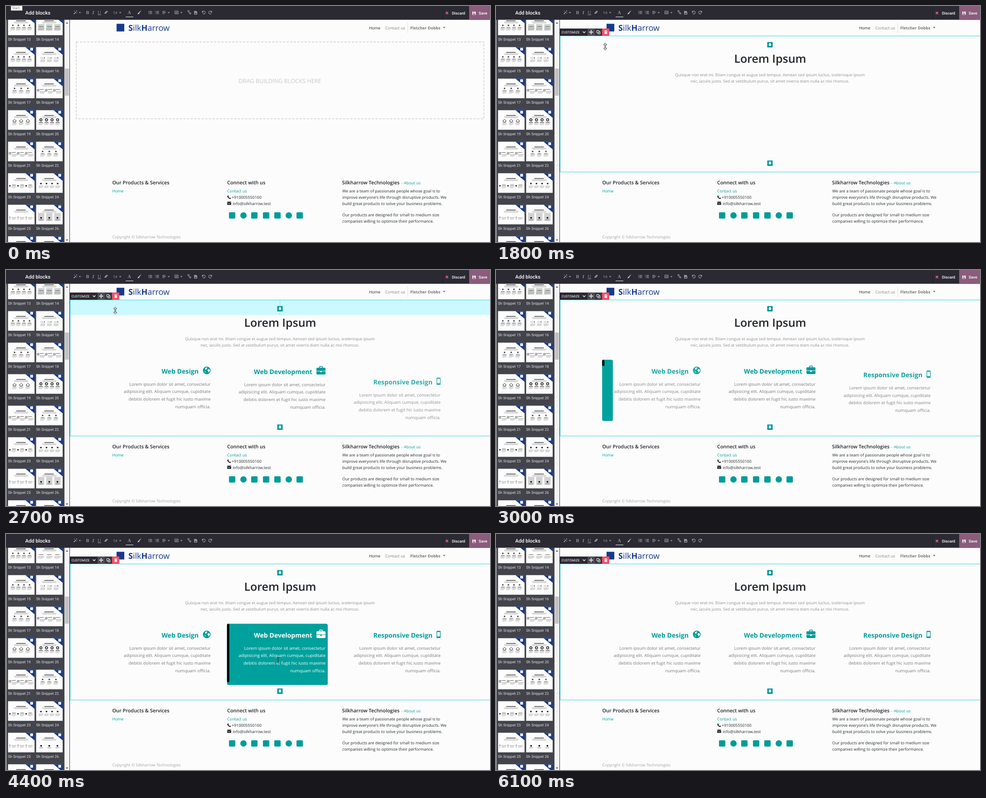
These frames come from a looping animation (1068x524 px, 6400 ms). An HTML page:

```html
<!DOCTYPE html>
<html lang="en">
<head>
<meta charset="utf-8">
<title>Page builder</title>
<style>
  html, body { margin: 0; width: 100%; height: 100%; overflow: hidden; background: #fcfcfc; }
  svg { display: block; width: 100%; height: 100%; font-family: "Open Sans", "Noto Sans", sans-serif; text-rendering: geometricPrecision; }
  .ui { font-family: Roboto, sans-serif; }
  .serif { font-family: "Liberation Serif", serif; }
</style>
</head>
<body>
<svg id="stage" viewBox="0 0 1068 524"></svg>
<script>
const LOOP = 6400;
const TEAL = "#009c99", BAR = "#2b2a33", PANEL = "#43444b", BLUE = "#173a8c", TOOL = "#94949b";

const rect = (x, y, w, h, fill, extra = "") =>
  `<rect x="${x}" y="${y}" width="${w}" height="${h}" fill="${fill}" ${extra}/>`;
const circle = (x, y, r, fill, extra = "") =>
  `<circle cx="${x}" cy="${y}" r="${r}" fill="${fill}" ${extra}/>`;
const path = (d, fill, extra = "") => `<path d="${d}" fill="${fill}" ${extra}/>`;
const line = (d, stroke, width = 1, extra = "") =>
  path(d, "none", `stroke="${stroke}" stroke-width="${width}" ${extra}`);
const text = (x, y, label, size, fill, extra = "") =>
  `<text x="${x}" y="${y}" font-size="${size}" fill="${fill}" ${extra}>${label}</text>`;
const group = (id, body, extra = "") => `<g id="${id}" ${extra}>${body}</g>`;
const END = 'text-anchor="end"', MID = 'text-anchor="middle"';
const MEDIUM = 'font-weight="500"', SEMIBOLD = 'font-weight="600"';

// Snippet previews: column count and layout kind
const SNIPPETS = [
  [4, "ring"], [3, "panel"], [4, "ring"], [3, "side-dot"], [3, "ring"], [3, "side"], [3, "house"],
  [4, "bold"], [3, "side"], [3, "ring"], [3, "left-dot"], [4, "dot"], [3, "thin"], [3, "box"],
  [3, "ring"], [3, "dot"]
];

function previewItem(kind, x, y) {
  const lines = (dx, w) => rect(x + dx, y + 28, w, .8, "#999") +
    rect(x + dx, y + 30, w, .8, "#aaa") + rect(x + dx, y + 32, w * .8, .8, "#aaa");
  switch (kind) {
    case "ring": return circle(x, y + 21.7, 1.8, "#333", 'stroke="#bbb" stroke-width="1"') +
      rect(x - 4, y + 26, 8, 1, "#555") + lines(-5, 10);
    case "bold": return circle(x, y + 21.5, 2.5, "none", 'stroke="#111" stroke-width="1.5"') +
      rect(x - 4, y + 26.5, 8, 1, "#333") + lines(-5, 10);
    case "house": return line(`M${x - 4} ${y + 24}l4 -4l4 4h-1.5v2.5h-5v-2.5z`, "#333") + lines(-5, 10);
    case "dot": return circle(x, y + 23, 1.8, "#222") + lines(-5, 10);
    case "side-dot": return circle(x + 4, y + 24, 1.1, "#222") + rect(x - 5, y + 24, 7, .8, "#888") + lines(-5, 11);
    case "left-dot": return circle(x - 7, y + 28, 1.7, "#222") + rect(x - 2, y + 25.5, 8, 1, "#555") + lines(-3, 10);
    case "thin": return circle(x - 7, y + 28, 1.5, "#999") + rect(x - 7.3, y + 26, .8, 8, "#999") + lines(-3, 10);
    case "side": return rect(x - 8.5, y + 24, 3.6, 3.6, "none", 'stroke="#444" stroke-width=".9"') +
      rect(x - 3, y + 23.5, 9, 1, "#555") + lines(-3, 12);
    case "panel": return rect(x - 7, y + 19, 14, 14, "#ccd1cc", 'class="shade"') + rect(x - 5, y + 24, 10, 1, "#555") + lines(-7, 14);
    default: return rect(x - 7, y + 18, 14, 18, "#d2d2d2", 'class="shade"') +
      circle(x, y + 29, 1.9, "#111") + rect(x - 4, y + 33, 8, .9, "#555");
  }
}

function preview([count, kind], x, y) {
  const wide = /side$|left|thin|panel|box/.test(kind);
  const pitch = count === 4 ? 12.3 : wide ? 18 : 14.7;
  let body = rect(x, y, 58.5, 43.5, "#fdfdfd") + rect(x + 18, y + 11, 21, 1.4, "#333") +
    rect(x + 13, y + 14.3, 32, .8, "#999") + rect(x + 14, y + 16.2, 30, .8, "#aaa");
  for (let i = 0; i < count; i++) body += previewItem(kind, x + 29 + (i - (count - 1) / 2) * pitch, y);
  return body + path(`M${x + 38.5} ${y}h20v17z`, BLUE) + rect(x + 49, y + 1.5, 6, 6, "#fff");
}

function sidebar() {
  let body = rect(0, 30, 141, 494, PANEL) + rect(0, 0, 1, 524, "#d4d5d5");
  SNIPPETS.forEach((snippet, i) => {
    const x = i % 2 ? 66.5 : 4.5, y = 21.3 + 70 * (i >> 1);
    body += preview(snippet, x, y) +
      text(x, y + 55.5, `Sh Snippet ${13 + i}`, 8.2, "#e0e0e2", 'class="ui"');
  });
  return body + rect(129, 30, 11, 494, "#f4f4f4") + rect(130, 139, 9, 60, "#c2c2c4") +
    path("M132 39l2.5 -3l2.5 3z M132 518.5l2.5 3l2.5 -3z", "#444") + rect(140, 30, 1, 494, "#35353c");
}

function toolbar() {
  const caret = x => path(`M${x - 2.5} 13.5h5l-2.5 3z`, TOOL);
  const letter = (x, s, extra) => text(x, 18, s, 10.5, TOOL, `${MID} class="serif" ${extra}`);
  const bars = (x, widths) => widths.map((w, i) => rect(x, 11.2 + i * 2.5, w, 1.3, TOOL)).join("");
  const turn = (x, dir) => line(`M${x - 3 * dir} 11v3h${3 * dir}M${x - 3 * dir} 13.5a3.4 3.4 0 1 ${dir > 0 ? 1 : 0} ${dir} 3.5`, TOOL, 1.3);
  return rect(0, 0, 1068, 30.6, BAR) +
    text(42.5, 19, "Add blocks", 11.1, "#fff", `class="ui" ${MEDIUM}`) +
    line("M149.5 18l5 -5", TOOL, 1.8) + path("M155 10h2v2h-2z M150 10.5h1.5v1.5h-1.5z M155.5 15h1.5v1.5h-1.5z", TOOL) +
    caret(163) + letter(180, "B", 'font-weight="700"') + letter(192.5, "I", 'font-weight="700" font-style="italic"') +
    letter(206, "U", 'text-decoration="underline"') +
    path("M217 16l4 -5h4l-4 6h-4z", TOOL) +
    text(236, 18, "14", 8.5, TOOL, 'class="ui"') + caret(252) +
    letter(272, "A", 'font-weight="700"') + rect(264, 23.5, 17, 1.5, "#b5b5ba") +
    path("M299 9l-6 5l1.5 1.5z M290 18c1 0 1 -3.5 3 -3.5l1.5 1.5c0 2 -3 2.5 -4.5 2z", "#c5c5ca") +
    bars(314, [1.5, 1.5, 1.5]) + bars(316.5, [6, 6, 6]) +
    bars(329, [1, 1, 1]) + bars(331.5, [6, 6, 6]) +
    bars(345, [6, 8, 5]) + caret(359) +
    rect(372.5, 11, 7.5, 6.5, "none", `stroke="${TOOL}"`) + line("M372 13.5h8M372 15.5h8M376.3 11v7", TOOL, .8) + caret(387) +
    line("M403 13.5l-1.5 -1.5a1.2 1.2 0 0 1 2 -1.5l1.5 2M404.5 15.5l1.5 2a1.2 1.2 0 0 0 1.5 -2l-1.8 -1.5M402.5 13.5l3 2.5", TOOL, 1.3) +
    path("M415 11h5l2 2v6h-7z M416 17.5h5l-1.5 -2.5l-1.5 1.5l-1 -1z", TOOL, 'fill-rule="evenodd"') +
    turn(436, 1) + turn(451, -1) +
    rect(963, 0, 1, 30.6, "#1f1e26") + line("M970.5 13l5 5M975.5 13l-5 5", "#e6586c", 2) +
    text(984, 19, "Discard", 8.6, "#fff", `class="ui" ${MEDIUM}`) +
    rect(1022, 0, 46, 30.6, "#8b5c7c") + path("M1029 12h6l1.5 1.5v6h-7.5z M1030.5 12.5v2h3.5v-2z M1030.5 16.5v2.5h4.5v-2.5z", "#fff", 'fill-rule="evenodd"') +
    text(1043, 19, "Save", 8.8, "#fff", `class="ui" ${MEDIUM}`);
}

function header() {
  return rect(244, 39.5, 17, 17, BLUE) +
    text(270, 54.5, '<tspan font-weight="700">S</tspan>ilk<tspan font-weight="700">H</tspan>arrow', 18, BLUE) +
    text(801, 52, "Home", 8.85, "#222") + text(837, 52, "Contact us", 8.85, "#808080") +
    rect(886, 37, 1, 23, "#e2e2e2", 'class="shade"') +
    text(892, 52, "Fletcher Dobbs", 8.9, "#777", 'font-weight="700"') + path("M964 46.5h6l-3 3.3z", "#777");
}

function footer() {
  const heading = (x, s) => text(x, 395.5, s, 10.9, "#1f2225", SEMIBOLD);
  const body = (x, y, s, fill = "#24282b") => text(x, y, s, 8.85, fill);
  const about = ["We are a team of passionate people whose goal is to",
    "improve everyone's life through disruptive products. We",
    "build great products to solve your business problems."];
  const badge = (x, i) => i === 1 || i === 5 ? circle(x, 465, 7, TEAL) : rect(x - 7, 458, 14, 14, TEAL, 'rx="2"');
  return heading(234.5, "Our Products &amp; Services") + body(234.5, 413.5, "Home", TEAL) +
    heading(488, "Connect with us") + body(488, 413.5, "Contact us", TEAL) +
    path("M490 420.5l1.8 2l-1 1.2q1 2 2.8 2.6l1.1 -1l1.9 1.5q-1 2 -3 1.4q-4.5 -1.5 -5.2 -5.5q0 -1.5 1.6 -2.2z", "#222") +
    body(498, 427.5, "+910005550100") +
    rect(488, 434.5, 9, 7, "#222", 'rx="1"') + line("M488 436l4.5 3l4.5 -3", "#fcfcfc", .8) +
    body(500, 441.5, "info@silkharrow.test") +
    [499, 524, 548, 574, 599, 624, 648].map(badge).join("") +
    heading(741.5, "Silkharrow Technologies") + body(872, 395.5, "-", TEAL) + body(878, 395.5, "About us", TEAL) +
    about.map((s, i) => body(742, 413.5 + 14 * i, s)).join("") +
    body(742, 466.5, "Our products are designed for small to medium size") +
    body(742, 480.5, "companies willing to optimize their performance.") +
    body(234.5, 515.5, "Copyright © Silkharrow Technologies", "#a4a4a4");
}

// Cards are laid out from their right text edge
const CARDS = [
  { right: 451.5, title: "Web Design", titleEnd: -26.5, rise: 608, enter: 2920, leave: 3895,
    icon: "M-17 223a8.5 8.5 0 1 0 17 0a8.5 8.5 0 1 0 -17 0z M-12 217.5q2 -1.500 4 -1l1 1.500l-2.500 1l.5 2l-3 .5z M-5 220l3.500 1q0 4.500 -3 6.500l-1 -3l-2 -2z M-14 224l3 1.500l.5 3z" },
  { right: 705, title: "Web Development", titleEnd: -29, rise: 1000, enter: 3950, leave: 4680,
    icon: "M-20 218q0 -2 2 -2h4v-2q0 -1.5 1.5 -1.5h5q1.5 0 1.5 1.5v2h4q2 0 2 2v5h-20z M-12.5 216h5v-1.8h-5z M-20 224h8v2h4v-2h8v5q0 2 -2 2h-16q-2 0 -2 -2z" },
  { right: 959, title: "Responsive Design", titleEnd: -18, rise: 1990, enter: 4650, leave: 5450,
    icon: "M-9 216.5q0 -1.5 1.5 -1.5h6q1.5 0 1.5 1.5v13q0 1.5 -1.5 1.5h-6q-1.5 0 -1.5 -1.5z M-7.7 217.5v10h6.4v-10z" }
];
const COPY = ["Lorem ipsum dolor sit amet, consectetur", "adipisicing elit. Aliquam cumque, cupiditate",
  "debitis dolorem et fugit hic iusto maxime", "numquam officia."];

const card = (c, i) => group(`card${i}`,
  rect(-217.3, 199.3, 0, 136, "#00a09d", 'rx="4" class="fill"') +
  rect(-217.3, 199.3, 5, 0, "#000", 'rx="2.5" class="edge"') +
  `<g class="title">${text(c.titleEnd, 230, c.title, 14.15, "inherit", `${END} font-weight="700" style="fill:inherit"`)}
   <path d="${c.icon}" fill-rule="evenodd"/></g>
   <g class="copy">${COPY.map((s, n) => text(0, 256.7 + 16.7 * n, s, 9.5, "", `${END} style="fill:inherit"`)).join("")}</g>`);

function section() {
  const handle = y => rect(598.5, y - 6, 12, 12, "#00979c") +
    path(`M603 ${y - 4}h3v3.5h2.5l-4 4l-4 -4h2.5z`, "#fff");
  return group("resize", rect(141, 67, 927, 33, "#ccf9ff") + rect(604, 67, 1, 33, "#93e6ee")) +
    text(605, 125.5, "Lorem Ipsum", 25, "#212529", `${MID} ${SEMIBOLD}`) +
    text(604.5, 155.5, "Quisque non erat mi. Etiam congue et augue sed tempus. Aenean sed ipsum luctus, scelerisque ipsum", 8.82, "#8e8e8e", MID) +
    text(604.5, 169.5, "nec, iaculis justo. Sed at vestibulum purus, sit amet viverra diam nulla ac nisi rhoncus.", 8.82, "#8e8e8e", MID) +
    CARDS.map(card).join("") + rect(525, 97, 1, 36, "#222", 'id="caret"') +
    line("M1068 66.5H141.5V368.5H1068", "#35d5e6") + handle(86) + handle(349) +
    rect(141, 50, 61, 16, BAR) + text(144.5, 60.8, "CUSTOMIZE", 7.3, "#fff", 'class="ui"') +
    line("M191.5 56.5l3 3l3 -3", "#fff", 1.3) +
    rect(202, 50, 16, 16, "#4b4b55") + line("M206 58h8M210 54v8", "#fff", 1.3) +
    path("M208.5 55l1.5 -2l1.5 2z M208.5 61l1.5 2l1.5 -2z M207 56.5l-2 1.5l2 1.5z M213 56.5l2 1.5l-2 1.5z", "#fff") +
    rect(218, 50, 16, 16, "#3a3a43") + line("M222.5 54.5h4.5v5h-4.5zM225 59.5v2.5h4.5v-5h-2.5", "#fff") +
    rect(234, 50, 16, 16, "#f0526a") + path("M239 55h6.5v1.3h-6.5z M241 54h2.5v1h-2.5z M239.7 57h5.2v5h-5.2z", "#fff");
}

const outline = 'stroke="#222" stroke-width=".9" stroke-linejoin="round"';
const moveArrow = [0, 90, 180, 270].map(a =>
  path("M-1 -1V-4.5H-3L0 -8L3 -4.5H1V-1z", "#fff", `${outline} transform="rotate(${a})"`)).join("");

const stage = document.getElementById("stage");
stage.innerHTML = rect(0, 0, 1068, 524, "#fcfcfc") + header() + footer() +
  group("placeholder", rect(155, 80, 899.5, 170.5, "none", 'stroke="#cdcdcd" stroke-width="1.5" stroke-dasharray="5 3"') +
    text(604.5, 170.7, "DRAG BUILDING BLOCKS HERE", 12.74, "#c6c8ca", MID)) +
  group("section", section()) + sidebar() + toolbar() +
  group("dropzone", line("M141 67H1068", "#875a7b", 1.5, 'stroke-dasharray="5 3"') +
    line("M141.5 53v8M141.5 68v11M1067 53v8M1067 68v11", "#6d4a63", 1.5)) +
  group("helper", group("helperThumb", preview(SNIPPETS[3], 0, 0), 'transform="scale(1.15)"') +
    rect(0, 50, 67, 21, PANEL) + rect(.5, .5, 66, 70.5, "none", 'stroke="#55565d"') +
    text(3.5, 64.5, "Sh Snippet 16", 7.5, "#fff", 'class="ui"')) +
  group("moveCursor", moveArrow) +
  group("resizeCursor", path("M0 -8l3.5 4h-2.5v8h2.5l-3.5 4l-3.5 -4h2.5v-8h-2.5z", "#fff", outline)) +
  group("textCursor", line("M-2.5 -6h2l.5 .5l.5 -.5h2M0 -5.5v11M-2.5 6h2l.5 -.5l.5 .5h2", "#222")) +
  group("tooltip", rect(11, 0, 25, 10, "#fff", 'stroke="#999" stroke-width=".6"') + text(14, 7.3, "Start", 7.3, "#555"));

const $ = id => document.getElementById(id);
const show = (id, on) => $(id).setAttribute("display", on ? "inline" : "none");
const place = (id, [x, y]) => $(id).setAttribute("transform", `translate(${x} ${y})`);
const clamp = u => Math.min(1, Math.max(0, u));
const ease = u => { u = clamp(u); return u * u * (3 - 2 * u); };
const mix = (a, b, u) => `rgb(${a.map((v, i) => Math.round(v + (b[i] - v) * u))})`;
const WHITE = [255, 255, 255];

// Position along [time, x, y] keys
function along(keys, t) {
  const last = keys[keys.length - 1];
  if (t >= last[0]) return last.slice(1);
  const next = Math.max(1, keys.findIndex(k => k[0] >= t));
  const a = keys[next - 1], b = keys[next], u = clamp((t - a[0]) / (b[0] - a[0]));
  return [a[1] + (b[1] - a[1]) * u, a[2] + (b[2] - a[2]) * u];
}
const DRAG = [[480, 125, 128], [1000, 250, 135], [1290, 241, 90]];
const READ = [[4000, 545, 276], [4400, 600, 280], [5000, 850, 277], [5500, 975, 284]];

function updateCard(c, i, t) {
  const el = $(`card${i}`), part = name => el.querySelector("." + name);
  const lift = t < 2000 ? 1 : clamp(1 - (t - 2000) / c.rise) ** 4;
  const grow = ease((t - c.enter) / 400) - ease((t - c.leave) / 400);
  place(el.id, [c.right, 136 * lift]);
  el.setAttribute("opacity", 1 - lift);
  part("fill").setAttribute("width", 222.3 * grow);
  part("edge").setAttribute("height", 130 * grow);
  part("title").setAttribute("fill", mix([0, 156, 153], WHITE, t < c.leave ? grow : 0));
  part("copy").setAttribute("fill", mix([122, 122, 122], WHITE, grow));
}

const shades = stage.querySelectorAll(".shade");

function update(t) {
  const dragging = t >= 480 && t < 1780;
  const soft = (t >= 780 && t < 1780) || t >= 3480;
  shades.forEach(s => s.setAttribute("opacity", soft ? 0 : 1));
  show("tooltip", t < 90);
  show("placeholder", t < 580);
  show("dropzone", t >= 580 && t < 1780);
  show("helper", dragging);
  show("moveCursor", dragging);
  const [x, y] = along(DRAG, t);
  place("moveCursor", [x, y]);
  place("helper", [x - 69, y - 44]);
  show("section", t >= 1780);
  show("resize", t >= 1880 && t < 2780);
  show("resizeCursor", t >= 1780 && t < 2780);
  place("resizeCursor", [241, 90]);
  show("textCursor", t >= 4000 && t < 5500);
  place("textCursor", along(READ, t));
  show("caret", t >= 3480 && (t + 830) % 1060 < 550);
  CARDS.forEach((c, i) => updateCard(c, i, t));
}

const start = performance.now();
function tick() {
  update((performance.now() - start) % LOOP);
  requestAnimationFrame(tick);
}
tick();
</script>
</body>
</html>
```
